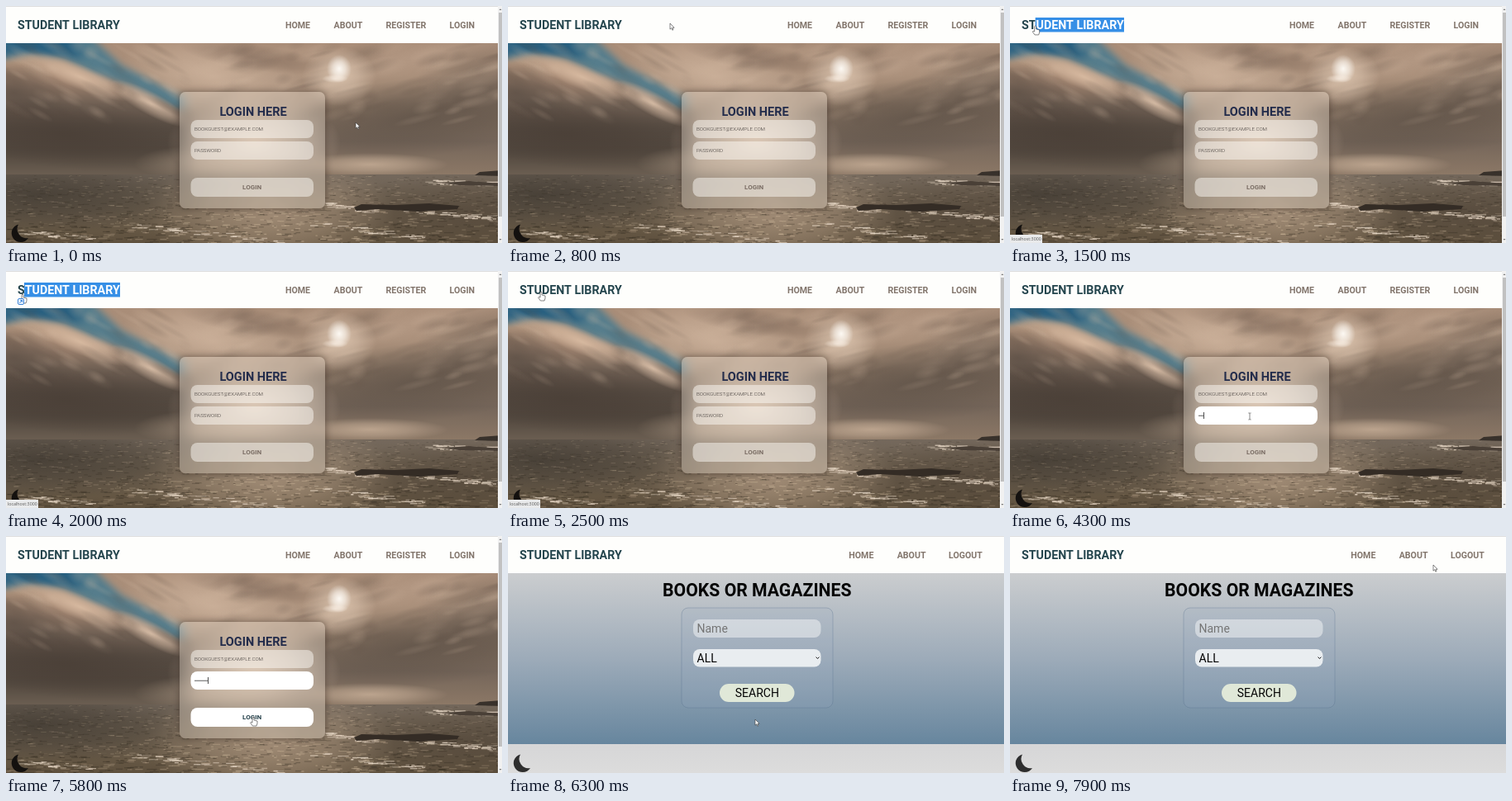
Recreate the animation shown at these times as an HTML page with a canvas. Size 600 by 287 pixels, loop 8 s.

```html
<!DOCTYPE html>
<html lang="en">
<head>
<meta charset="utf-8">
<title>Student Library</title>
<style>
  html, body { margin: 0; width: 100%; height: 100%; overflow: hidden; background: #fdfdfb; }
  canvas { display: block; width: 600px; height: 287px; }
</style>
</head>
<body>
<canvas id="stage" width="600" height="287"></canvas>
<script>
const W = 600, H = 287, LOOP = 8000, STEP = 100;
const HEADER = 45, HORIZON = 204;
const ctx = document.getElementById('stage').getContext('2d');

const moon = new Path2D('M15 264.4A11 11 0 1 0 27 281A11.3 11.3 0 0 1 15 264.4Z');
const arrow = new Path2D('M0 0V7.2L1.7 5.7L2.8 8.2L4 7.7L2.9 5.3H5.1Z');
const hand = new Path2D('M-1 .8Q0-.6 1 .8V4L5 5V8L4 11H-.7L-3.4 7.2Q-3.2 5.6-1 7Z');
const ibeam = new Path2D('M-1.6-4H-.4L0-3.6L.4-4H1.6M0-3.6V3.6M-1.6 4H-.4L0 3.6L.4 4H1.6');

// Cursor stops: time, x, y
const stops = [
  [0, 423, 141], [800, 196, 21], [1000, 139, 23], [1600, 22, 24], [1900, 20, 28],
  [2300, 20, 28], [2700, 60, 22], [3400, 298.5, 188.5], [3900, 290, 176], [5300, 290, 176],
  [5800, 299, 219], [6000, 299, 222], [6600, 299, 222], [7500, 501, 86], [7900, 512, 35]
];
const keyTimes = [4100, 4200, 4300, 4500, 4700, 4800, 5000, 5200];

function cursorAt(t) {
  const i = stops.findIndex(s => s[0] >= t);
  if (i === 0) return { x: stops[0][1], y: stops[0][2] };
  const [t0, x0, y0] = stops[i - 1], [t1, x1, y1] = stops[i];
  const u = (t - t0) / (t1 - t0), k = u * u * (3 - 2 * u);
  return { x: x0 + (x1 - x0) * k, y: y0 + (y1 - y0) * k };
}

function seeded(seed) {
  return () => (seed = (seed * 16807) % 2147483647) / 2147483647;
}

function vertical(c, y0, y1, colors) {
  const g = c.createLinearGradient(0, y0, 0, y1);
  colors.forEach((color, i) => g.addColorStop(i / (colors.length - 1), color));
  return g;
}

function box(x, y, w, h, r, fill) {
  ctx.beginPath();
  ctx.roundRect(x, y, w, h, r);
  ctx.fillStyle = fill;
  ctx.fill();
}

function label(str, x, y, size, color, weight = 400, align = 'left') {
  ctx.font = `${weight} ${size}px Roboto, sans-serif`;
  ctx.textAlign = align;
  ctx.fillStyle = color;
  ctx.fillText(str, x, y);
}

function layer(paint) {
  const el = document.createElement('canvas');
  el.width = W;
  el.height = H;
  paint(el.getContext('2d'));
  return el;
}

function glow(c, x, y, rx, ry, rgb, alpha, tilt = 0) {
  c.save();
  c.translate(x, y);
  c.rotate(tilt);
  c.scale(rx, ry);
  const g = c.createRadialGradient(0, 0, 0, 0, 0, 1);
  g.addColorStop(0, `rgba(${rgb},${alpha})`);
  g.addColorStop(.5, `rgba(${rgb},${alpha * .6})`);
  g.addColorStop(1, `rgba(${rgb},0)`);
  c.fillStyle = g;
  c.fillRect(-1, -1, 2, 2);
  c.restore();
}

function soft(c, path, fill, blur) {
  c.filter = `blur(${blur}px)`;
  c.fillStyle = fill;
  c.fill(new Path2D(path));
  c.filter = 'none';
}

function paintSky(c) {
  const rnd = seeded(41);
  c.fillStyle = vertical(c, HEADER, HORIZON, ['#a98d78', '#aa907b', '#8d7866', '#75665a', '#8c7866']);
  c.fillRect(0, HEADER, W, HORIZON - HEADER);

  // Warm light above the form, darker masses to the right
  glow(c, 250, 85, 110, 50, '214,187,164', .7, .2);
  glow(c, 300, 62, 90, 16, '120,98,84', .5, .15);
  glow(c, 500, 62, 120, 20, '188,161,140', .5, -.2);
  glow(c, 500, 135, 190, 48, '92,80,70', .8, -.1);
  glow(c, 585, 100, 90, 60, '98,85,75', .6);
  glow(c, 330, 105, 90, 30, '190,164,143', .5);

  // Blue gap, then the cloud bank below it
  soft(c, 'M-10 30H95L140 72L218 112L212 128L150 108L90 78L-10 72Z', '#567d8c', 4);
  soft(c, 'M-10 30H75L95 62L50 62L-10 64Z', '#286080', 6);
  soft(c, 'M-10 66L30 58L70 64L105 82L150 96L190 116L222 134V215H-10Z',
    vertical(c, 60, 205, ['#b89b83', '#a48772', '#6f5f53', '#554a41', '#51473e', '#6c5f52']), 4);
  glow(c, 90, 86, 70, 15, '226,196,170', .8, .38);
  glow(c, 175, 118, 55, 14, '226,198,174', .85, .5);
  glow(c, 10, 105, 75, 38, '88,76,67', .75, .2);
  glow(c, 70, 155, 150, 42, '72,61,53', .7, .1);

  for (let i = 0; i < 170; i++) {
    const x = rnd() * W, y = HEADER + rnd() * 95;
    const rgb = rnd() < .5 ? '220,194,170' : '84,70,60';
    glow(c, x, y, 10 + rnd() * 26, 3 + rnd() * 7, rgb, .06 + rnd() * .14, x < 240 ? .5 : -.25);
  }

  glow(c, 300, 165, 105, 55, '226,202,180', .85);
  glow(c, 245, 190, 90, 22, '190,168,146', .5);
  glow(c, 440, 192, 95, 14, '205,180,156', .75);
  glow(c, 403, 85, 45, 36, '235,212,190', .7);
  glow(c, 403, 76, 15, 17, '255,252,247', .95);
  glow(c, 398, 88, 16, 5, '255,246,236', .6);
}

function paintSea(c) {
  const rnd = seeded(77);
  c.fillStyle = vertical(c, HORIZON, H, ['#74685c', '#6f6252', '#6a5c4a', '#5e503d']);
  c.fillRect(0, HORIZON, W, H - HORIZON);
  glow(c, 40, 228, 210, 48, '60,54,47', .75);
  glow(c, 560, 250, 180, 46, '72,61,50', .55);
  glow(c, 320, 250, 150, 75, '196,170,145', .6);
  for (let i = 0; i < 1600; i++) {
    const depth = rnd(), x = rnd() * W;
    const lit = Math.exp(-(((x - 320) / 190) ** 2));
    c.fillStyle = rnd() < .35 + lit * .2
      ? `rgba(205,183,155,${.16 + lit * .3})`
      : 'rgba(44,37,29,.3)';
    c.fillRect(x, HORIZON + 1 + depth * (H - HORIZON), 2 + rnd() * (3 + depth * 8), .5 + depth * .9);
  }
  // Foam bands: x, y, width, drop
  const foam = [[0, 273, 100, 7], [150, 266, 180, 18], [365, 262, 140, 20], [500, 212, 95, 4], [480, 246, 115, 12], [385, 240, 60, 9]];
  for (const [x, y, w, drop] of foam) {
    for (let i = 0; i < 36; i++) {
      const u = rnd();
      c.fillStyle = `rgba(238,222,204,${.3 + rnd() * .5})`;
      c.fillRect(x + u * w, y + u * drop + (rnd() - .5) * 6, 3 + rnd() * 11, .6 + rnd());
    }
  }
  soft(c, 'M421 244L430 240L470 241L512 239L548 242L546 246L500 249L450 246L424 248Z', '#342c25', .6);
  soft(c, 'M533 214L560 212L600 215V218L548 217Z', '#4a4037', .6);
}

const photo = layer(c => {
  paintSky(c);
  c.save();
  c.beginPath();
  c.rect(0, HORIZON, W, H);
  c.clip();
  paintSea(c);
  c.restore();
  soft(c, 'M567 205L573 201L600 199V206Z', '#38312b', .4);
});

const frosted = layer(c => {
  c.filter = 'blur(6px)';
  c.drawImage(photo, 0, 0);
});

function drawHeader(links, right) {
  ctx.fillStyle = '#fefefc';
  ctx.fillRect(0, 0, right, HEADER);
  ctx.fillStyle = '#dedede';
  ctx.fillRect(0, 0, W, 1);
  label('STUDENT LIBRARY', 14, 28, 14.25, '#24454d', 700);
  for (const [name, x] of links) label(name, x, 27, 10.6, '#82756c', 700);
}

function drawSelection(x) {
  const left = Math.max(22, x);
  ctx.save();
  ctx.beginPath();
  ctx.rect(left, 14, 138 - left, 17.5);
  ctx.clip();
  ctx.fillStyle = '#368fe6';
  ctx.fillRect(0, 0, W, HEADER);
  label('STUDENT LIBRARY', 14, 28, 14.25, '#fff', 700);
  ctx.restore();
}

function drawStatus(t) {
  if (t < 1000 || t >= 3600) return;
  const fading = t >= 3200;
  ctx.globalAlpha = fading ? .1 + (3600 - t) / 1200 : 1;
  ctx.fillStyle = '#e9eaeb';
  ctx.fillRect(0, 277, fading ? 52 : 39, 10);
  ctx.globalAlpha = fading ? .15 : 1;
  ctx.font = '5.3px "Open Sans", sans-serif';
  ctx.textAlign = 'left';
  ctx.fillStyle = '#555';
  ctx.fillText('localhost:3000', 2, 284.3);
  ctx.globalAlpha = 1;
}

function drawScrollbar() {
  ctx.fillStyle = '#f1f1f1';
  ctx.fillRect(595, 0, 5, H);
  ctx.fillStyle = '#c1c1c1';
  ctx.fillRect(596, 8, 4, 247);
  ctx.fillStyle = '#777';
  ctx.fill(new Path2D('M596.5 5L598 3.2L599.5 5ZM596.5 282L598 283.8L599.5 282Z'));
}

function drawLoginCard(t, p) {
  ctx.save();
  ctx.shadowColor = 'rgba(35,25,20,.5)';
  ctx.shadowBlur = 9;
  box(210, 104, 176, 141, 7, '#a08b78');
  ctx.restore();
  ctx.save();
  ctx.beginPath();
  ctx.roundRect(210, 104, 176, 141, 7);
  ctx.clip();
  ctx.drawImage(frosted, 0, 0);
  ctx.restore();
  box(210, 104, 176, 141, 7, 'rgba(255,245,235,.25)');

  const pale = 'rgba(255,252,248,.48)';
  const focused = t >= 3900;
  const hover = t > 5300 && p.y > 208;
  label('LOGIN HERE', 299, 132.6, 14.5, '#232c4b', 700, 'center');
  box(223.5, 138, 148.5, 22, 8, pale);
  label('BOOKGUEST@EXAMPLE.COM', 228, 151.3, 6.2, '#3c3633', 300);

  box(223.5, 164, 148.5, 22, 8, focused ? '#fff' : pale);
  const typed = keyTimes.filter(k => k <= t).length;
  if (!typed) label('PASSWORD', 228, 177.2, 6.15, '#3c3633', 300);
  ctx.fillStyle = '#222';
  for (let i = 0; i < typed; i++) {
    ctx.beginPath();
    ctx.arc(229 + i * 2, 175.2, .7, 0, 7);
    ctx.fill();
  }
  if (focused) ctx.fillRect(228 + typed * 2, 171, .8, 8);

  box(223.5, 208, 148.5, 23, 8, hover ? '#fff' : pale);
  label('LOGIN', 297.6, 222.3, 8, hover ? '#24404a' : '#7b6e65', 700, 'center');
}

function drawMoon(color) {
  ctx.fillStyle = color;
  ctx.fill(moon);
}

function drawLogin(t, p) {
  ctx.drawImage(photo, 0, 0);
  drawHeader([['HOME', 338], ['ABOUT', 396.5], ['REGISTER', 459.5], ['LOGIN', 536.5]], 595);
  if (t >= 1000 && t < 2400) drawSelection(p.x);
  drawLoginCard(t, p);
  drawMoon('#14110f');
  drawStatus(t);
  drawScrollbar();
}

function drawSearch() {
  ctx.fillStyle = vertical(ctx, HEADER, 252, ['#cbcdcf', '#9dabb9', '#67869e']);
  ctx.fillRect(0, HEADER, W, 207);
  ctx.fillStyle = vertical(ctx, 252, H, ['#d6d6d7', '#dcdcdc']);
  ctx.fillRect(0, 252, W, 35);
  drawHeader([['HOME', 412.3], ['ABOUT', 470.7], ['LOGOUT', 533]], W);

  label('BOOKS OR MAGAZINES', 301.3, 73, 21.2, '#050505', 700, 'center');
  box(210, 87, 183, 121, 8, 'rgba(150,170,190,.16)');
  ctx.strokeStyle = 'rgba(85,112,138,.4)';
  ctx.lineWidth = .8;
  ctx.stroke();

  box(224, 101, 154.5, 22, 8, 'rgba(240,243,245,.55)');
  label('Name', 228.5, 117, 14, '#757575');
  box(224, 137, 154.5, 21.5, 8, '#e9edf0');
  label('ALL', 228.5, 153, 14, '#000');
  ctx.strokeStyle = '#111';
  ctx.lineWidth = 1;
  ctx.stroke(new Path2D('M372.6 146.6L374.5 148.5L376.4 146.6'));
  box(256, 179, 90.5, 22, 11, '#e0e8d8');
  label('SEARCH', 301.3, 195, 14, '#050505', 400, 'center');
  drawMoon('#2e2e2e');
}

function drawCursor(t, { x, y }) {
  const onLink = t >= 1000 && t < 2800 && x < 138;
  const onButton = t > 5300 && t < 6000 && y > 208;
  const inField = t >= 3700 && t < 6000 && y < 186;
  ctx.save();
  ctx.translate(x, y);
  ctx.lineWidth = .6;
  ctx.strokeStyle = '#333';
  ctx.fillStyle = '#fff';
  if (inField) {
    ctx.stroke(ibeam);
  } else {
    const shape = onLink || onButton ? hand : arrow;
    ctx.fill(shape);
    ctx.stroke(shape);
  }
  ctx.restore();
  if (t >= 1700 && t < 2400) {
    box(14.5, 33.5, 7, 7, 1.5, '#eaf3fd');
    ctx.strokeStyle = '#3f86d8';
    ctx.lineWidth = 1;
    ctx.stroke();
    ctx.stroke(new Path2D('M16.3 38.8L19.6 35.4M17.2 35.4H19.6V37.8'));
  }
}

function frame(now) {
  const t = Math.floor((now % LOOP) / STEP) * STEP;
  const p = cursorAt(t);
  if (t < 6000) drawLogin(t, p);
  else drawSearch();
  drawCursor(t, p);
  requestAnimationFrame(frame);
}
requestAnimationFrame(frame);
</script>
</body>
</html>
```
